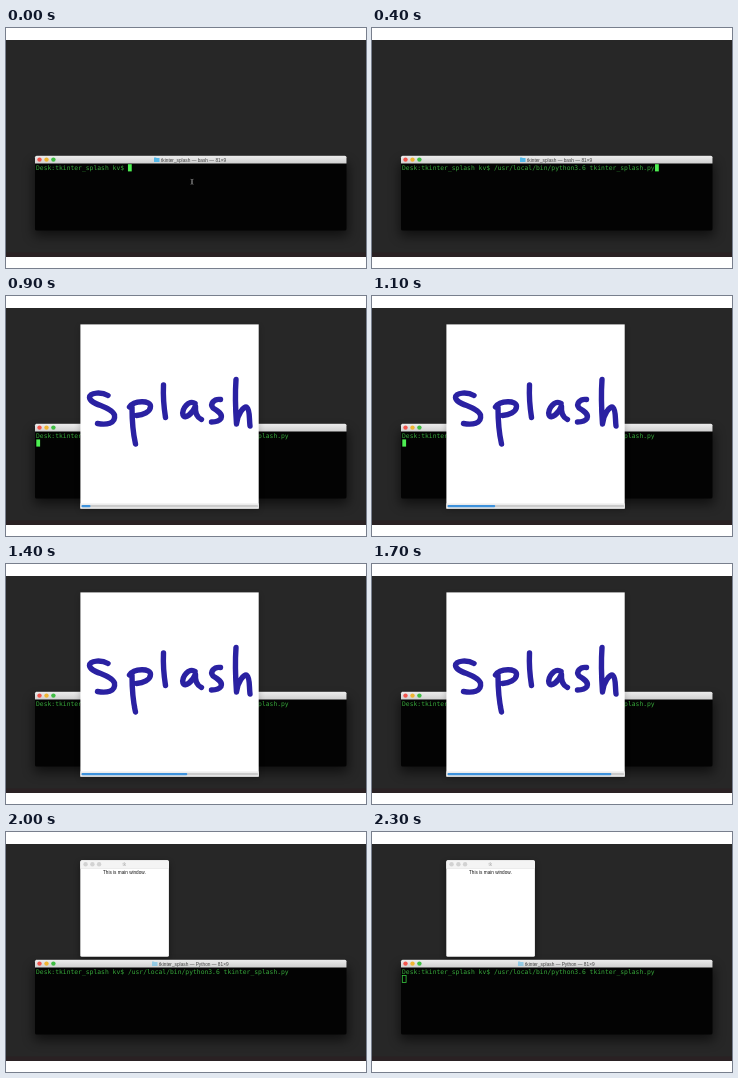
An HTML page that plays this animation: 360 by 240 pixels, repeating every 2.4 s.

```html
<!DOCTYPE html>
<html lang="en">
<head>
<meta charset="utf-8">
<title>Splash screen demo</title>
<style>
html, body { margin: 0; width: 100%; height: 100%; overflow: hidden; background: #fff; }
svg { display: block; width: 360px; height: 240px; }
text { white-space: pre; }
.mono { font: 6.37px "DejaVu Sans Mono", monospace; fill: #37a83b; }
.sans { font: 4.75px "Liberation Sans", Arial, sans-serif; fill: #444; }
.ink { fill: none; stroke: #2a21a2; stroke-width: 5.4; stroke-linecap: round; stroke-linejoin: round; }
</style>
</head>
<body>
<svg viewBox="0 0 360 240">
  <defs>
    <linearGradient id="bar" x2="0" y2="1">
      <stop stop-color="#ededed"/><stop offset="1" stop-color="#cfcfcf"/>
    </linearGradient>
    <filter id="blur" x="-20%" y="-40%" width="140%" height="190%"><feGaussianBlur stdDeviation="6"/></filter>
    <filter id="soft" x="-20%" y="-20%" width="140%" height="140%"><feGaussianBlur stdDeviation="3"/></filter>
    <clipPath id="desk"><rect y="12" width="360" height="217"/></clipPath>
  </defs>

  <g clip-path="url(#desk)">
    <rect y="12" width="360" height="213" fill="#272727"/>
    <rect y="224.5" width="360" height="5" fill="#2a2123"/>

    <g id="main">
      <rect x="74" y="31" width="89" height="96" fill="#000" opacity=".4" filter="url(#soft)"/>
      <rect x="74.3" y="28.3" width="88.6" height="96.5" rx="1.6" fill="#fff"/>
      <path d="M74.3 36.5V29.9Q74.300 28.300 75.900 28.300H161.300Q162.900 28.300 162.900 29.900V36.5Z" fill="#f4f4f4"/>
      <path d="M74.3 36.5H162.9" stroke="#dedede" stroke-width=".5"/>
      <g fill="#d2d2d2">
        <circle cx="79.6" cy="32.2" r="2.2"/><circle cx="86.4" cy="32.2" r="2.2"/><circle cx="93.1" cy="32.2" r="2.2"/>
      </g>
      <text class="sans" x="116.5" y="33.9" style="fill:#aaa">tk</text>
      <text class="sans" x="97" y="41.8" style="font-size:4.66px;fill:#111">This is main window.</text>
    </g>

    <rect x="28" y="135" width="314" height="73" fill="#000" opacity=".6" filter="url(#blur)"/>
    <rect x="29" y="127.7" width="311.5" height="74.8" rx="1.6" fill="#030303"/>
    <path d="M29 135.6V129.3Q29 127.700 30.600 127.700H338.900Q340.500 127.700 340.500 129.300V135.6Z" fill="url(#bar)"/>
    <circle cx="33.5" cy="131.6" r="2.2" fill="#f2564e"/>
    <circle cx="40.5" cy="131.6" r="2.2" fill="#efb532"/>
    <circle cx="47.4" cy="131.6" r="2.2" fill="#3fbd43"/>
    <g id="title">
      <path id="folder" d="M0 129.4h2l.6.7h2.900v3.900H0z" fill="#55b9e9"/>
      <text id="name" class="sans" x="7" y="133.5"></text>
    </g>
    <text id="line" class="mono" x="30" y="142.1"></text>
    <rect id="caret" width="3.8" height="7.2" stroke="#37c83f"/>
    <path id="pointer" fill="none" stroke="#999" stroke-width=".7"
      d="M184.6 151.3q1.400 0 1.400 1v3q0 1 -1.400 1M187.400 151.300q-1.400 0 -1.400 1v3q0 1 1.400 1"/>

    <g id="splash">
      <rect x="74" y="31" width="179" height="183" fill="#000" opacity=".2" filter="url(#soft)"/>
      <rect x="74.4" y="28.4" width="178.3" height="184.2" fill="#fff"/>
      <rect x="74.4" y="207.4" width="178.3" height="5.2" fill="#ededed"/>
      <rect x="75.5" y="209" width="176.5" height="2.2" rx="1" fill="#cbcbcb"/>
      <rect id="done" x="75.5" y="209" height="2.2" rx="1" fill="#3e92dc"/>
      <g class="ink">
        <path d="M102 99.5C96 96 84 96 83.500 101.500C84 109 105 110 108.500 119C110 128 100 129 91.500 127.500"/>
        <path d="M126 111C126 122 127 137 129.500 148M123.500 111C128 104 145 104 144.500 110.500C144.500 116 137 119 130.500 119.500"/>
        <path d="M157.500 89C157 100 158 112 159.500 121.500"/>
        <path d="M189 107.500C183 103 175.500 113 177 119C179 124 187 117 189.500 110C189 117 191 121.500 195.500 123.500"/>
        <path d="M214.500 103.500C208 102.500 203.500 108 207 112C212 115 217 118 215 122.500C212.500 126 209 126 205.500 126"/>
        <path d="M230 83.500C229 98 229.500 114 230.500 128C231 119 238 109 241 111.500C244 114 243 122 244 130"/>
      </g>
    </g>
  </g>
</svg>
<script>
const LOOP = 2400, STEP = 100, CHAR = 3.835;
const PROMPT = "Desk:tkinter_splash kv$ ";
const COMMAND = "/usr/local/bin/python3.6 tkinter_splash.py";
const at = { hide: 100, command: 200, enter: 600, python: 700, splash: 900, blink: 1200, main: 1800, idle: 2300 };
const el = id => document.getElementById(id);
const show = (id, on) => { el(id).style.display = on ? "" : "none"; };

function draw(t) {
  const typed = t >= at.command, entered = t >= at.enter, python = t >= at.python;
  const idle = t >= at.idle;

  el("line").textContent = PROMPT + (typed ? COMMAND : "");
  el("name").textContent = `tkinter_splash — ${python ? "Python" : "bash"} — 81×9`;
  el("title").setAttribute("transform", `translate(${python ? 146 : 148} 0)`);
  el("folder").setAttribute("opacity", python ? 0.55 : 1);

  const col = entered ? 0 : PROMPT.length + (typed ? COMMAND.length : 0);
  const caret = el("caret");
  caret.setAttribute("x", 30.3 + col * CHAR - (col ? 0.4 : 0));
  caret.setAttribute("y", entered ? 143.4 : 136.2);
  caret.setAttribute("fill", idle ? "none" : "#4df052");
  caret.setAttribute("stroke-width", idle ? 0.8 : 0);
  show("caret", t < at.blink || idle);
  show("pointer", t < at.hide);

  show("splash", t >= at.splash && t < at.main);
  show("main", t >= at.main);
  el("done").setAttribute("width", Math.max(0, 9 + (t - at.splash) * 0.1935));
}

const start = performance.now();
function tick() {
  const t = (performance.now() - start) % LOOP;
  draw(Math.floor(t / STEP) * STEP);
  requestAnimationFrame(tick);
}
tick();
</script>
</body>
</html>
```
